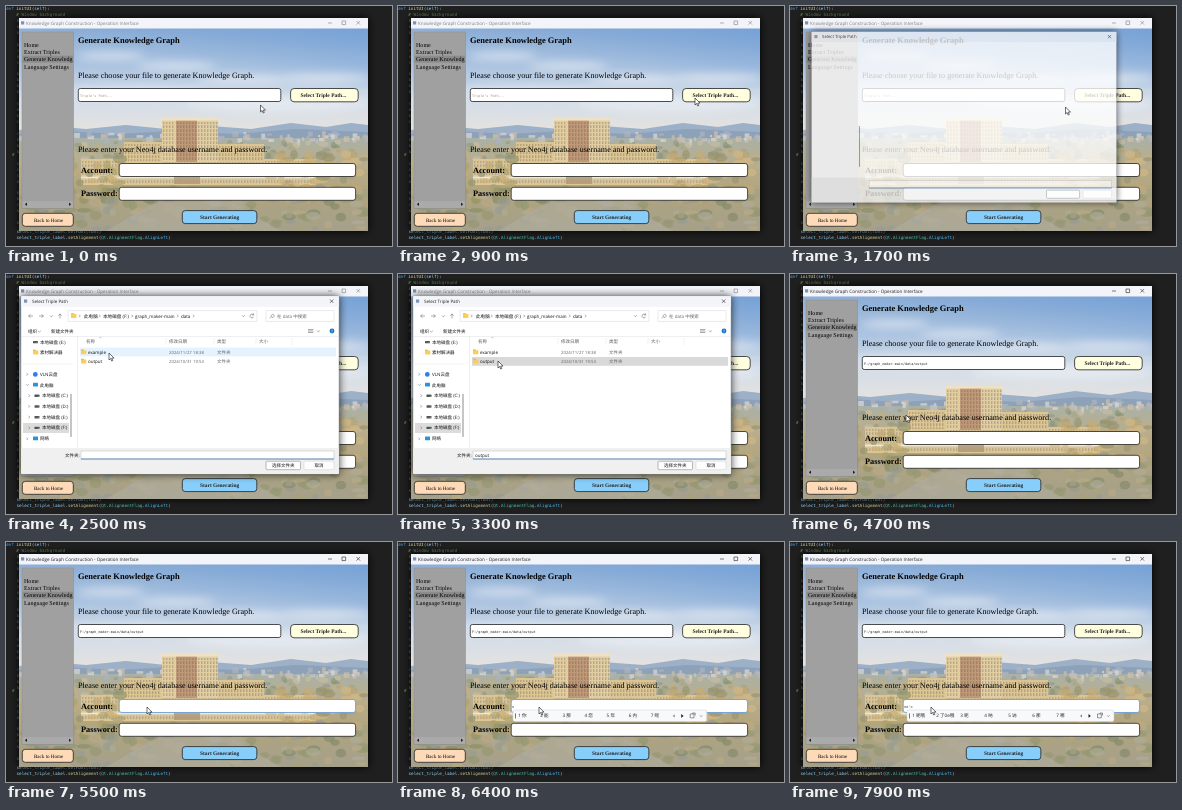
These frames come from a looping animation (386x240 px, 8000 ms). An HTML page:

```html
<!DOCTYPE html>
<html lang="en">
<head>
<meta charset="utf-8">
<title>Knowledge graph interface</title>
<style>
  html, body { margin: 0; width: 100%; height: 100%; overflow: hidden; background: #1f1f1f; }
  svg { display: block; width: 100vw; height: 100vh; text-rendering: geometricPrecision; }
  text { white-space: pre; }
  .serif { font-family: "Liberation Serif", "Times New Roman", serif; }
  .ui { font-family: "Open Sans", "Noto Sans CJK SC", "Noto Sans CJK", sans-serif; }
  .code { font-family: "DejaVu Sans Mono", monospace; }
  .bold { font-weight: bold; }
</style>
</head>
<body>
<svg id="stage" viewBox="0 0 386 240" xmlns="http://www.w3.org/2000/svg"></svg>
<script>
const LOOP = 8000;

let seed = 11;
const random = () => (seed = (seed * 16807) % 2147483647) / 2147483647;
const between = (a, b) => a + random() * (b - a);
const pick = list => list[Math.floor(random() * list.length)];
const repeat = (n, make) => Array.from({ length: n }, (_, i) => make(i)).join('');

const rect = (x, y, w, h, fill, extra = '') =>
  `<rect x="${x}" y="${y}" width="${w}" height="${h}" fill="${fill}" ${extra}/>`;
const text = (x, y, size, value, cls = 'ui', fill = '#111', extra = '') =>
  `<text x="${x}" y="${y}" font-size="${size}" class="${cls}" fill="${fill}" ${extra}>${value}</text>`;
const line = (d, stroke = '#333', width = 0.5, extra = '') =>
  `<path d="${d}" fill="none" stroke="${stroke}" stroke-width="${width}" ${extra}/>`;
const blob = (x, y, rx, ry, fill, opacity = 1) =>
  `<ellipse cx="${x}" cy="${y}" rx="${rx}" ry="${ry}" fill="${fill}" opacity="${opacity}"/>`;
const box = (x, y, w, h, fill, r = 2.5, id = '') =>
  rect(x, y, w, h, fill, `rx="${r}" stroke="#222" stroke-width=".8" ${id && `id="${id}"`}`);
const folder = (x, y) =>
  rect(x, y - 4, 3, 2, '#e0a526', 'rx=".4"') + rect(x, y - 3.3, 5.4, 4, '#f9cf5b', 'rx=".5"');
const chevron = (x, y) => line(`M${x} ${y - 1.3}l1.3 1.3l-1.3 1.3`, '#555');
const caretDown = (x, y) => line(`M${x} ${y}l1.4 1.4l1.4 -1.4`, '#555');

function editor() {
  const row = i => 4 + i * 5.95;
  const span = (color, value) => `<tspan fill="${color}">${value}</tspan>`;
  const size = 4.27;
  return rect(0, 0, 386, 240, '#1f1f1f') +
    text(0, row(0), size, span('#569cd6', 'def ') + span('#dcdcaa', 'initUI') + '(' +
      span('#9cdcfe', 'self') + '):', 'code', '#ccc') +
    text(10.3, row(1), size, '# Window background', 'code', '#6a9955') +
    repeat(35, i => i % 5 === 3 ? '' :
      text(10.5, row(i + 2), size, 's', 'code', pick(['#9cdcfe', '#9cdcfe', '#4ec9b0', '#6a9955']), 'opacity=".7"')) +
    text(6, 149.5, size, '#', 'code', '#6a9955') +
    text(10.5, 226.5, size, 'select_triple_label.setFont(font)', 'code', '#9cdcfe') +
    text(10.5, 232.5, size, span('#9cdcfe', 'select_triple_label') + '.' + span('#dcdcaa', 'setAlignment') +
      '(' + span('#4ec9b0', 'Qt') + '.' + span('#4ec9b0', 'AlignmentFlag') + '.' +
      span('#4fc1ff', 'AlignLeft') + ')', 'code', '#ccc');
}

function photo() {
  const clouds = [[105, 50, 34, 4], [170, 60, 40, 4], [235, 74, 45, 4], [320, 72, 45, 4], [130, 86, 70, 5], [270, 98, 90, 7]];
  const windows = (x, y, w, h, wall, glass) => rect(x, y, w, h, wall) +
    repeat(Math.floor(w / 3), i => rect(x + 1 + i * 3, y + 2, 1.4, h - 3, glass, 'opacity=".6"')) +
    repeat(Math.floor(h / 4), i => rect(x, y + 4 + i * 4, w, 1.2, wall));
  const scatter = (n, x0, x1, y0, y1, size, colors) => repeat(n, () =>
    blob(between(x0, x1), between(y0, y1), between(size * 0.6, size * 1.6), between(size * 0.4, size), pick(colors), 0.65));
  const city = repeat(90, () =>
    rect(between(13, 360), between(125, 134), between(2, 7), between(2, 6), pick(['#d6d3cf', '#b9bfc8', '#c9b8a0', '#a4adb8']), 'opacity=".75"'));
  return `<g clip-path="url(#client)">` + rect(13, 22, 349, 203, 'url(#sky)') +
    rect(13, 22, 349, 60, 'url(#deep)') +
    `<g filter="url(#soft)">${clouds.map(c => blob(...c, '#eef2f7', 0.6)).join('')}</g>
     <path d="M13 124L45 120L80 123L120 119L160 123L205 120L245 123L285 117L320 121L345 117L362 119V140H13Z" fill="#94a9c3"/>
     <path d="M13 128L60 125L110 128L165 125L230 128L290 123L362 126V140H13Z" fill="#8399b3"/>` +
    rect(13, 132, 349, 93, 'url(#ground)') + city +
    `<g filter="url(#blur)">${scatter(110, 13, 361, 136, 154, 3.5, ['#7e8a6c', '#a39f7c', '#bda777', '#8c9179', '#c6b99a'])}</g>` +
    windows(75, 153, 235, 26, '#d9c08a', '#8d8a80') +
    windows(118, 136, 38, 20, '#d8c08c', '#94815f') + windows(212, 138, 46, 18, '#d8c08c', '#94815f') +
    windows(156, 114, 14, 42, '#dfc998', '#9c8a6c') + windows(170, 114, 21, 42, '#b8906c', '#8c6650') +
    windows(191, 114, 21, 42, '#dfc998', '#8d8478') + rect(155, 112, 58, 2.6, '#eddfbd') +
    rect(75, 170.5, 235, 2, '#efe6cc') + rect(168, 158, 26, 20, '#a98f6c', 'opacity=".8"') +
    `<g filter="url(#blur)">${scatter(60, 13, 115, 150, 196, 5, ['#b9a066', '#a3985f', '#c9ab67', '#8b8b5f'])}
      ${scatter(70, 265, 361, 148, 196, 5, ['#c1a468', '#a89461', '#8f8b62', '#ccb27c'])}
      ${scatter(150, 13, 361, 181, 224, 5, ['#8a8d66', '#a09a74', '#b3a27a', '#787f5e', '#a8a590', '#8f9488'])}
      <path d="M100 225L150 196H225L275 225Z" fill="#a9a698" opacity=".55"/></g>` +
    rect(13, 22, 349, 203, '#fff', 'opacity=".08"') + '</g>';
}

function mainWindow() {
  const menu = ['Home', 'Extract Triples', 'Generate Knowledg', 'Language Settings'];
  return rect(13, 12, 349, 213, '#111', 'filter="url(#shadow)"') + photo() +
    rect(13, 12, 349, 10.5, '#f2f4f9') + rect(15, 15.3, 3.2, 3.2, '#7c93b5') +
    '<g id="caption">' +
    text(20, 18.6, 4.6, 'Knowledge Graph Construction - Operation Interface', 'ui', '#222') +
    line('M322 17h4M336 15h3.6v3.6h-3.6zM350.5 15l3.6 3.6m0 -3.6l-3.6 3.6', '#222', 0.6) + '</g>' +
    rect(16, 26, 51.5, 176.5, '#a0a0a0', 'stroke="#8a8a8a" stroke-width=".5"') +
    rect(16.5, 49.7, 50.5, 7, '#8c8c8c') +
    menu.map((label, i) => text(18, 40.6 + i * 7.35, 6.05, label, 'serif', '#000')).join('') +
    rect(16.5, 195, 50.5, 7, '#aaa') +
    `<path d="M21 196.6v3.4l-2.2 -1.7zM63 196.6v3.4l2.2 -1.7z" fill="#222"/>` +
    box(16.3, 207.3, 51, 13, '#ffdab9', 3) + text(28, 215.8, 5.05, 'Back to Home', 'serif', '#000') +
    text(72, 36.6, 8.45, 'Generate Knowledge Graph', 'serif bold', '#000') +
    text(72, 72, 8.1, 'Please choose your file to generate Knowledge Graph.', 'serif', '#000') +
    box(72.3, 82.5, 202.5, 13, '#fff', 2) +
    text(74, 90.8, 3.42, '', 'code', '#999', 'id="path"') +
    box(284.6, 82.5, 67.6, 13.3, '#ffffe0', 3.5) +
    text(294.5, 91, 5.5, 'Select Triple Path...', 'serif bold', '#222') +
    text(72, 146, 8.12, 'Please enter your Neo4j database username and password.', 'serif', '#000') +
    text(75, 167, 8.25, 'Account:', 'serif bold', '#000') + box(113.2, 157.5, 236.4, 13, '#fff', 2.5, 'account') +
    text(75, 190.4, 8.3, 'Password:', 'serif bold', '#000') + box(113.2, 181.3, 236.4, 13, '#fff') +
    text(114.3, 165.6, 3.42, '', 'code', '#222', 'id="typed"') +
    box(176.3, 204.6, 74.5, 13, '#87cefa', 3) +
    text(194, 213, 5.4, 'Start Generating', 'serif bold', '#222');
}

function dialogShell() {
  return rect(15, 22, 318, 178, '#000', 'filter="url(#shadow)" opacity=".8"') +
    rect(15, 22, 318, 178, '#fff', 'stroke="#8d949d" stroke-width=".5" rx="1"') +
    rect(15.3, 22.3, 317.4, 10.5, '#f3f5f9') + rect(18, 25.5, 3.2, 3.2, '#7c93b5') +
    text(26, 28.8, 4.5, 'Select Triple Path', 'ui', '#222') +
    line('M324 25.5l3.4 3.4m0 -3.4l-3.4 3.4', '#222', 0.6) +
    rect(15.3, 174, 317.4, 25.8, '#f0f0f0') + rect(64.5, 120, 1, 43, '#8b8b8b', 'rx=".5"') +
    rect(75, 177, 253, 8, '#fff', 'stroke="#bbb" stroke-width=".5"') + line('M75 185H328', '#3f78b5', 0.8) +
    rect(260, 187.2, 34.5, 8.5, '#fdfdfd', 'id="accept" rx="1" stroke-width=".6"') +
    rect(298, 187.2, 30, 8.5, '#fdfdfd', 'rx="1" stroke="#ccc" stroke-width=".5"');
}

function dialogContent() {
  const disk = (x, y) => rect(x, y - 2.6, 5, 2.4, '#555', 'rx=".6"') + rect(x + 3.4, y - 1.2, 1, 0.6, '#7fe08c');
  const drive = (letter, y) => chevron(22.5, y - 1.5) + disk(28.5, y) + text(36, y, 4.5, `本地磁盘 (${letter}:)`);
  const file = (name, date, y) => folder(75, y) + text(82, y, 4.5, name) +
    text(163, y, 4.3, date, 'ui', '#666') + text(211, y, 4.5, '文件夹', 'ui', '#666');
  return line('M27 42h-4.4m1.8 -1.8l-1.8 1.8l1.8 1.8M33 42h4.4m-1.8 -1.8l1.8 1.8l-1.8 1.8M54 44.3v-4.4m-1.8 1.8l1.8 -1.8l1.8 1.8', '#555') +
    caretDown(44, 41.5) +
    rect(62, 36.8, 189, 10.4, '#fff', 'stroke="#d5d5d5" stroke-width=".5"') + folder(65, 43.3) +
    chevron(73, 42) + text(78, 43.7, 4.6, '此电脑') + chevron(93, 42) + text(97, 43.7, 4.6, '本地磁盘 (F:)') +
    chevron(125.5, 42) + text(129, 43.7, 4.5, 'graph_maker-main') + chevron(171, 42) +
    text(175, 43.7, 4.5, 'data') + chevron(187, 42) + caretDown(236, 41.3) +
    line('M247.3 40.7a1.9 1.9 0 1 0 .4 2M247.6 39.4v1.6h-1.6', '#555') +
    rect(260, 36.8, 68, 10.4, '#fff', 'stroke="#d5d5d5" stroke-width=".5"') +
    line('M266.6 40.4a1.5 1.5 0 1 0 .1 0M265.3 42.9l-1.3 1.4', '#555') + text(271, 43.7, 4.5, '在 data 中搜索', 'ui', '#666') +
    text(22, 58.8, 4.5, '组织') + caretDown(32, 56.8) + text(45, 58.8, 4.5, '新建文件夹') +
    line('M302 55.5h5.4M302 57h5.4M302 58.5h5.4', '#555') + caretDown(311, 56.5) +
    blob(326, 57, 2.4, 2.4, '#1674c8') + text(325, 58.8, 4.5, '?', 'ui', '#fff') +
    line('M15 62.5H333M71.5 62.5V174', '#dedede') +
    disk(27, 69.5) + text(34, 69.5, 4.5, '本地磁盘 (E:)') + folder(27, 79.8) + text(34, 79.8, 4.5, '素材解决器') +
    line('M17 90H67', '#e4e4e4') +
    chevron(20.5, 100.3) + blob(29.3, 100.4, 2.4, 2.4, '#2f7fe6') + text(34, 101.8, 4.5, 'VLN云盘') +
    line('M20 110.3l1.3 1.3l1.3 -1.3', '#555') + rect(27, 108.8, 5, 3.6, '#2b93d8', 'rx=".4"') + text(34, 112.7, 4.5, '此电脑') +
    rect(17, 149, 46, 10, '#dcdcdc') +
    ['C', 'D', 'E', 'F'].map((letter, i) => drive(letter, 123.2 + i * 10.7)).join('') +
    chevron(20.5, 164.8) + rect(27, 162.5, 5, 3.8, '#2b93d8', 'rx=".4"') + text(34, 166.3, 4.5, '网络') +
    text(80, 69, 4.5, '名称', 'ui', '#555') + text(163, 69, 4.5, '修改日期', 'ui', '#555') +
    text(211, 69, 4.5, '类型', 'ui', '#555') + text(253, 69, 4.5, '大小', 'ui', '#555') +
    line('M160 64v7M208 64v7M250 64v7M286 64v7', '#e2e2e2') +
    line('M93 64.3l1.3 -1.3l1.3 1.3', '#777', 0.4) +
    rect(74, 73.6, 256, 8.8, '#e5f3ff', 'id="row"') +
    file('example', '2024/11/27 18:38', 79.6) + file('output', '2024/10/31 19:53', 88.8) +
    text(59, 182.9, 4.5, '文件夹:') + text(77, 182.6, 4.5, '', 'ui', '#111', 'id="chosen"') +
    text(266, 193.2, 4.5, '选择文件夹') + text(308.5, 193.2, 4.5, '取消');
}

const stage = document.getElementById('stage');
stage.innerHTML = `<defs>
  <linearGradient id="sky" x1="0" y1="22" x2="0" y2="132" gradientUnits="userSpaceOnUse">
    <stop offset="0" stop-color="#86a9d3"/><stop offset=".35" stop-color="#a4bedd"/>
    <stop offset=".65" stop-color="#cfdae7"/><stop offset="1" stop-color="#e6e0da"/></linearGradient>
  <linearGradient id="deep" x1="0" y1="1" x2="1" y2="0">
    <stop offset=".45" stop-color="#5f93d2" stop-opacity="0"/><stop offset="1" stop-color="#5f93d2" stop-opacity=".7"/></linearGradient>
  <linearGradient id="ground" x1="0" y1="0" x2="0" y2="1">
    <stop offset="0" stop-color="#a3aa9f"/><stop offset=".3" stop-color="#b3a680"/>
    <stop offset=".6" stop-color="#a99c72"/><stop offset="1" stop-color="#9d9883"/></linearGradient>
  <clipPath id="client"><rect x="13" y="22" width="349" height="203"/></clipPath>
  <filter id="soft" x="-20%" y="-50%" width="140%" height="200%"><feGaussianBlur stdDeviation="4"/></filter>
  <filter id="blur"><feGaussianBlur stdDeviation=".6"/></filter>
  <filter id="shadow" x="-10%" y="-10%" width="120%" height="120%"><feGaussianBlur stdDeviation="4"/></filter>
  </defs>` + editor() + mainWindow() +
  `<g id="dialog">${dialogShell()}<g id="content">${dialogContent()}</g></g><g id="ime"></g>
  <path id="arrow" d="M0 0V7L1.6 5.5L2.7 8L3.8 7.5L2.7 5.1H5Z" fill="#fff" stroke="#111" stroke-width=".6"/>`;
const part = Object.fromEntries([...stage.querySelectorAll('[id]')].map(node => [node.id, node]));

// Moments of the session, in ms
const PRESS = 1350, OPEN = 1600, LOADED = 1850, PICK = 3100, ACCEPT = 4200, FOCUS = 5300;

// Pointer stops: time, x, y
const pointer = [
  [0, 254.5, 99], [200, 254.5, 99], [900, 297, 92], [PRESS, 297, 92], [1650, 275.5, 101], [1850, 275.5, 101],
  [2400, 103, 79], [2700, 103, 79], [3000, 100, 87], [3300, 100, 87], [3950, 267, 188], [ACCEPT, 267, 188],
  [4700, 116, 141], [5150, 141, 165], [LOOP, 141, 165]
];
// Input steps: time, letters, bar position, candidate spacing, candidates
const typing = [
  [6200, 'n', 115, 22.1, '你能那您年内呢'],
  [6900, 'ne', 116, 22.6, '呢讷哪呐那疒内'],
  [7400, "ne'o", 117, 24, ['呢哦', '了0e哦', '呢', '呐', '讷', '那', '哪']]
];

const clamp = v => Math.min(1, Math.max(0, v));
const ease = v => v * v * (3 - 2 * v);

function pointerAt(t) {
  const i = pointer.findIndex(stop => stop[0] > t);
  const [t0, x0, y0] = pointer[i - 1], [t1, x1, y1] = pointer[i];
  const k = ease((t - t0) / (t1 - t0));
  return [x0 + (x1 - x0) * k, y0 + (y1 - y0) * k];
}

function candidates([, , x, step, words]) {
  const end = x + 7 + step * 7;
  return rect(x, 168, end - x + 32, 11.6, '#f8f9fb', 'rx="2" stroke="#c9ced6" stroke-width=".5"') +
    rect(x + 2, 171, 0.9, 5.6, '#2878d0', 'rx=".4"') +
    [...words].map((word, i) => text(x + 5.2 + i * step, 175.4, 4.6, `${i + 1} ${word}`, 'ui', '#222')).join('') +
    `<path d="M${end} 172.2v3.4l-2 -1.7z" fill="#888"/><path d="M${end + 6.5} 172v3.8l2.4 -1.9z" fill="#222"/>` +
    line(`M${end + 15.5} 172h3.8v3.8h-3.8zM${end + 18} 172v-1h2.5v2.5`, '#333') + caretDown(end + 25, 173.3);
}

let shownStep;
function update(t) {
  const [x, y] = pointerAt(t);
  part.arrow.setAttribute('transform', `translate(${x} ${y})`);

  const open = clamp((t - OPEN) / 180) * (1 - clamp((t - ACCEPT - 50) / 150));
  part.dialog.setAttribute('opacity', clamp(open * 1.4));
  part.dialog.setAttribute('transform', `translate(174 112) scale(${0.9 + 0.1 * ease(open)}) translate(-174 -112)`);
  part.content.setAttribute('opacity', t >= LOADED ? 1 : 0);
  const active = open === 0 && t >= PRESS;
  part.caption.setAttribute('opacity', active ? 1 : 0.55);

  const selected = t >= PICK;
  const onOutput = y > 83 && t > 2700;
  part.row.setAttribute('y', onOutput ? 83 : 73.6);
  part.row.setAttribute('fill', selected ? '#d9d9d9' : '#e5f3ff');
  part.row.setAttribute('opacity', selected || y < 91 ? 1 : 0);
  part.chosen.textContent = selected ? 'output' : '';
  const hover = selected && y > 187;
  part.accept.setAttribute('fill', hover ? '#dcecf9' : '#fdfdfd');
  part.accept.setAttribute('stroke', hover ? '#0078d4' : '#8a8a8a');

  const filled = t >= ACCEPT + 100;
  part.path.textContent = filled ? 'F:/graph_maker-main/data/output' : "Triple's Path...";
  part.path.setAttribute('fill', filled ? '#222' : '#a3907f');

  const step = typing.filter(s => s[0] <= t).pop();
  part.account.setAttribute('stroke', t >= FOCUS ? '#5f97d8' : '#222');
  part.typed.textContent = step ? step[1] : '';
  if (step !== shownStep) {
    part.ime.innerHTML = step ? candidates(step) : '';
    shownStep = step;
  }
}

function frame() {
  update(performance.now() % LOOP);
  requestAnimationFrame(frame);
}
frame();
</script>
</body>
</html>
```
